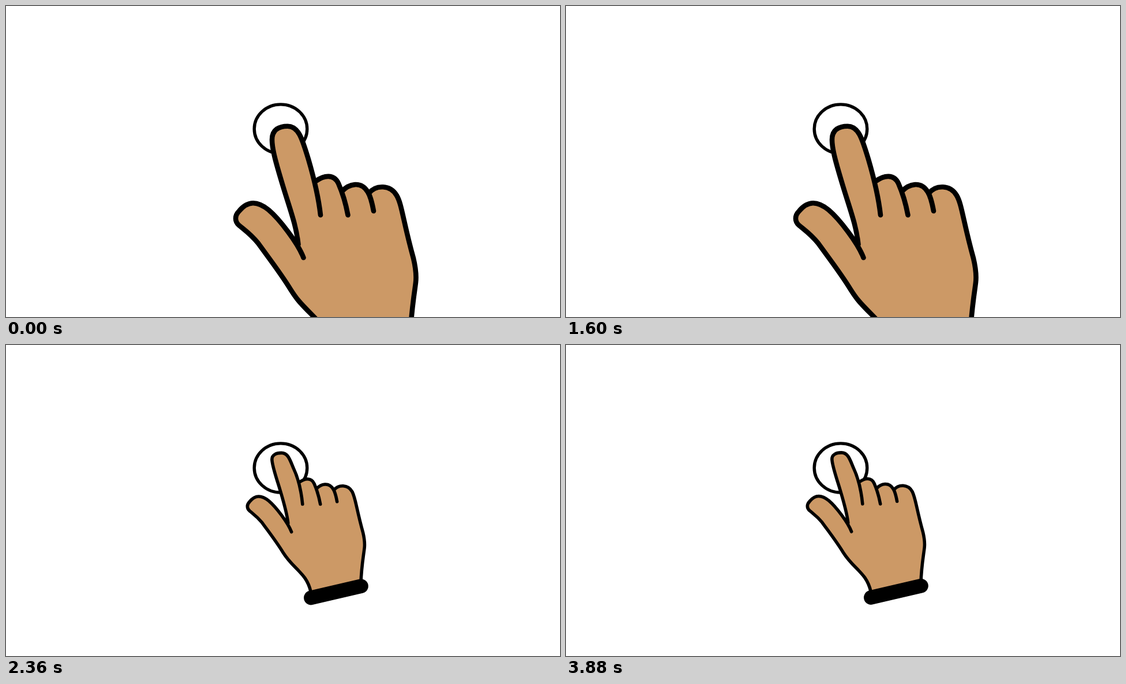
An HTML page for the animation above (3.92 s loop, 960x540 px).

```html
<!DOCTYPE html>
<html lang="en">
<head>
<meta charset="utf-8">
<title>Tapping hand</title>
<style>
  html, body { margin: 0; width: 100%; height: 100%; overflow: hidden; background: #fff; }
  svg { display: block; width: 100%; height: 100%; }
  .line { fill: none; stroke: #000; stroke-linecap: round; stroke-linejoin: round; stroke-width: 8.6; }
  .skin { fill: #c96; }
  .cuff { stroke-width: 38.2; }
  .ring { fill: #fff; stroke: #000; stroke-width: 5.4; }
</style>
</head>
<body>
<svg viewBox="0 0 960 540">
  <ellipse class="ring" cx="476" cy="213.5" rx="45.8" ry="42.6"/>
  <g id="hand">
    <path id="skin" class="skin"/>
    <path id="outline" class="line"/>
    <path class="line cuff" d="M567.5 613L701.2 581.8"/>
  </g>
</svg>
<script>
const STEP = 40, LOOP = 3920, TAP = 1600;
const SHRINK_STEPS = 13, SETTLED_STEP = 19, END_SCALE = 0.65;

const thumb = 'M567 597C560 566 545 551 528 534C509 515 503 508 493 492C478 467 458 441 437 412' +
  'C424 396 416 391 404 381C396 374 396 364 404 356C419 338 435 338 455 354C474 370 506 412 515.5 437';
const straightFinger = 'M506.5 414C503 381 493 356 480 313C467 270 461 248 461 232' +
  'C461 214 474 208.7 488 208.7C508 208.7 514 234 524 266C531 290 541 327 545 363';
const pressedFinger = 'M506.5 414C503 381 489 337 478 302C468 270 463.5 252 463.5 243' +
  'C463.5 232 474 226 488.5 226C506 226 511 243 520.5 266C531 288 541 322 545 363';
const knuckles = 'M537 304C551 294 568 291 576 308C583 324 589 344 592.5 363' +
  'M582 322C594 309 615 303 627 323C632 331 635 345 637 356' +
  'M629 325C641 310 666 310 677 329C686 344 688 373 706 438C710 455 711.5 467 710 480' +
  'C707 505 702 530 700.5 575';

const $ = id => document.getElementById(id);

function setFinger(finger) {
  const line = thumb + finger + knuckles;
  $('outline').setAttribute('d', line);
  // Joining the strokes end to end gives the filled hand.
  $('skin').setAttribute('d', 'M' + line.slice(1).replaceAll('M', 'L') + 'Z');
}

function draw(time) {
  const step = Math.floor(((time % LOOP) % TAP) / STEP + 0.001);
  const pressed = step > SHRINK_STEPS;
  const scale = 1 - (1 - END_SCALE) * Math.min(1, step / SHRINK_STEPS);
  // The hand shrinks towards (451, 124), then settles while pressing.
  let x = 451 * (1 - scale), y = 124 * (1 - scale);
  if (pressed) {
    x = 159.6;
    y = 40.5 - 0.25 * Math.max(0, SETTLED_STEP - step);
  }
  setFinger(pressed ? pressedFinger : straightFinger);
  $('hand').setAttribute('transform', `translate(${x} ${y}) scale(${scale})`);
}

const start = performance.now();
function tick() {
  draw(performance.now() - start);
  requestAnimationFrame(tick);
}
tick();
</script>
</body>
</html>
```
